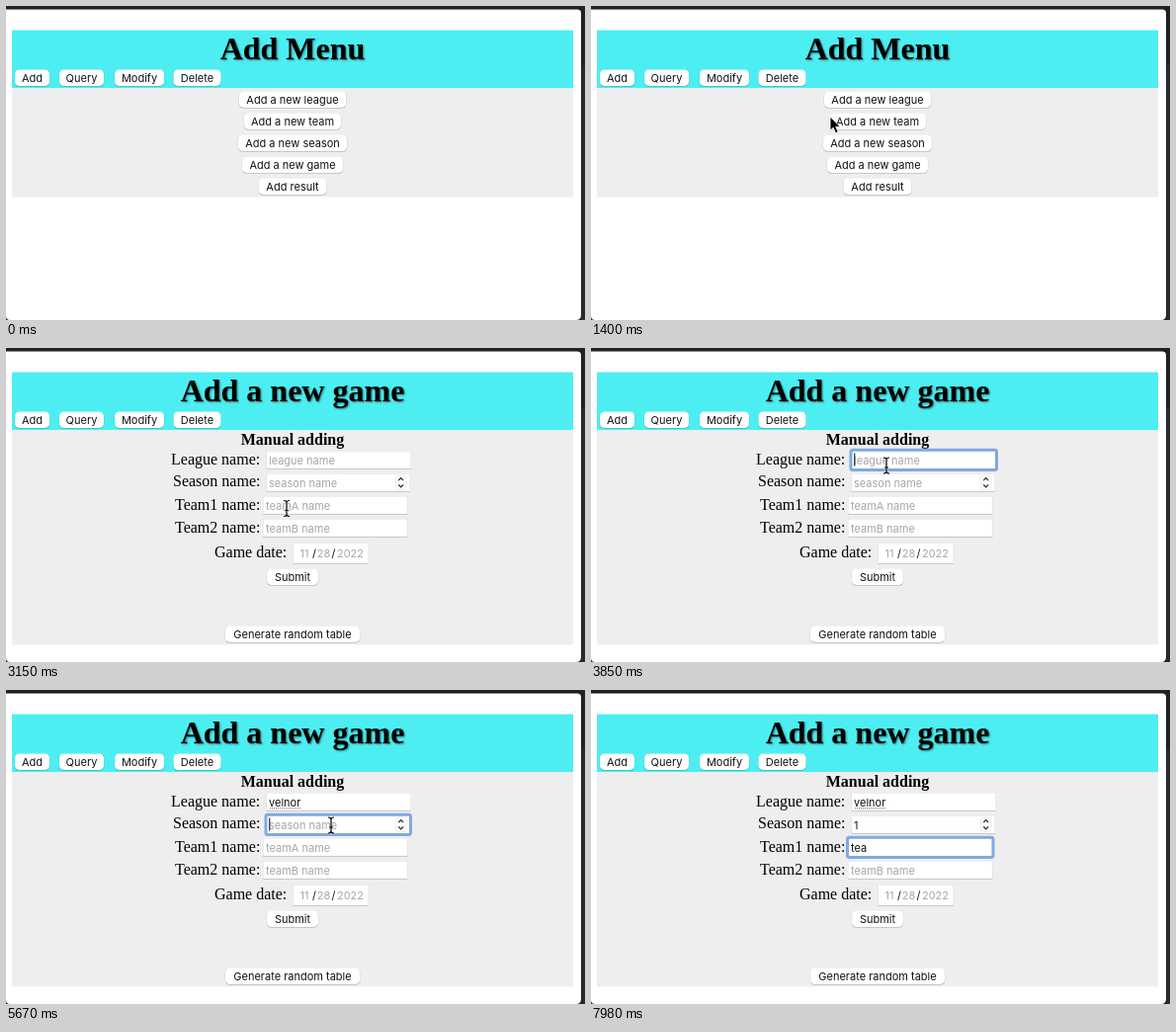
Write an HTML page that moves like this. It is 586x318 px and loops after 8000 ms.

```html
<!DOCTYPE html>
<html lang="en">
<head>
<meta charset="utf-8">
<title>Add a new game</title>
<style>
  html, body { margin: 0; width: 100%; height: 100%; overflow: hidden; background: #1f2127; }
  svg { display: block; width: 586px; height: 318px; }
  text { white-space: pre; }
  .ui { font: 11px Inter, Roboto, sans-serif; fill: #111; }
  .hint { fill: #a6a6a6; }
  .serif { font: 16px "Liberation Serif", serif; }
  .bold { font-weight: bold; }
  .title { font: bold 32px "Liberation Serif", serif; text-shadow: 1px 1px 2px rgba(0, 0, 0, .5); }
  .mid { text-anchor: middle; }
</style>
</head>
<body>
<svg id="stage" viewBox="0 0 586 318" xmlns="http://www.w3.org/2000/svg"></svg>
<script>
const LOOP = 8000, STEP = 70;

const rect = (x, y, w, h, fill, extra = "") =>
  `<rect x="${x}" y="${y}" width="${w}" height="${h}" fill="${fill}" ${extra}/>`;

const text = (x, y, content, cls, extra = "") =>
  `<text x="${x}" y="${y}" class="${cls}" ${extra}>${content}</text>`;

const button = (cx, cy, w, label) =>
  rect(cx - w / 2 - .5, cy - 8, w + 1, 17.3, "#000", 'rx="4.8" opacity=".09"') +
  rect(cx - w / 2, cy - 7.6, w, 16.8, "#000", 'rx="4.4" opacity=".14"') +
  rect(cx - w / 2, cy - 8, w, 16.4, "#fff", 'rx="4.4"') +
  text(cx, cy + 4, label, "ui mid");

const field = (x, y, w, h = 18.5) =>
  rect(x, y, w, h, "#dedede") +
  rect(x + .5, y + .5, w - 1, h - 1, "#fff") +
  rect(x, y + h - .6, w, .9, "#c2c2c2");

const row = (label, labelX, baseline, x, y, w) =>
  text(labelX, baseline, label, "serif") + field(x, y, w);

const fields = {
  league: { x: 266, y: 117.5, hint: "league name", ring: [263, 103.2, 147.5, 20.3] },
  season: { x: 266, y: 140.5, hint: "season name", ring: [263, 126.2, 146.5, 20.3] },
  team1:  { x: 263, y: 163.5, hint: "teamA name",  ring: [259.5, 149.2, 147.5, 20.3] },
  team2:  { x: 263, y: 186.5, hint: "teamB name" }
};

const shell =
  rect(0, 0, 586, 318, "#1f2127") +
  rect(582, 60, 4, 258, "#2b2f36", 'opacity=".6"') +
  '<path d="M0 3.5H578Q582 3.5 582 7V313Q582 318 577 318H4Q0 318 0 314Z" fill="#fff"/>';

const header =
  rect(6, 24.5, 568, 58.5, "#4deef2") +
  button(26.5, 72.5, 35, "Add") + button(76.5, 72.5, 45, "Query") +
  button(135, 72.5, 50, "Modify") + button(193.5, 72.5, 48, "Delete");

const menuPage =
  rect(6, 83, 568, 110.5, "#eee") +
  text(290, 53.5, "Add Menu", "title mid") +
  [["Add a new league", 108], ["Add a new team", 98], ["Add a new season", 110],
   ["Add a new game", 102], ["Add result", 69]]
    .map(([label, w], i) => button(290, 94.5 + 22 * i, w, label)).join("");

const formPage =
  rect(6, 83, 568, 217.5, "#eee") +
  text(290, 53.5, "Add a new game", "title mid") +
  text(290, 97.5, "Manual adding", "serif bold mid") +
  row("League name:", 167, 118, 263.5, 104, 146.5) +
  row("Season name:", 169, 140, 263.5, 127, 145.5) +
  row("Team1 name:", 171, 164, 260, 150, 146.5) +
  row("Team2 name:", 171, 187, 260, 173, 146.5) +
  text(211, 212, "Game date:", "serif") + field(290.5, 197, 76.5, 21.5) +
  text(302, 211.7, "11", "ui hint mid") + text(312, 211.7, "/", "ui mid") +
  text(321.5, 211.7, "28", "ui hint mid") + text(331.5, 211.7, "/", "ui mid") +
  text(348.5, 211.7, "2022", "ui hint mid") +
  rect(394.5, 129, 10.5, 14.5, "#fff", 'rx="3" stroke="#ddd" stroke-width=".6"') +
  '<path d="M397.2 134.2L399.7 131.6L402.2 134.2M397.2 138.4L399.7 141L402.2 138.4" fill="none" stroke="#222" stroke-width="1.2"/>' +
  button(290, 231.5, 52, "Submit") + button(290, 289.5, 136, "Generate random table") +
  '<rect id="ring" fill="none" stroke="#80a9e2" stroke-width="3" rx="2"/>' +
  Object.entries(fields).map(([id, f]) => text(f.x, f.y, f.hint, "ui hint", `id="${id}"`)).join("") +
  '<path id="spelling" d="M267 119.8H299" stroke="#555" stroke-width="1" stroke-dasharray="1 1"/>' +
  rect(0, 0, 1, 13, "#000", 'id="caret"');

const pointer =
  '<g id="cursor">' +
  '<circle id="press" r="16.2" fill="none" stroke="#000" stroke-width="1.7"/>' +
  '<path id="arrow" d="M0 0V14.2L3.2 11.2L5.6 16.8L8.2 15.6L5.8 10.3H10.2Z" fill="#000" stroke="#fff" stroke-width=".9"/>' +
  '<g id="beam" fill="none"><path d="M-3 -8Q0 -8 0 -6Q0 -8 3 -8M0 -6V6M-3 8Q0 8 0 6Q0 8 3 8M-2 2H2" stroke="#fff" stroke-width="2.4" opacity=".7"/>' +
  '<path d="M-3 -8Q0 -8 0 -6Q0 -8 3 -8M0 -6V6M-3 8Q0 8 0 6Q0 8 3 8M-2 2H2" stroke="#000" stroke-width="1.2"/></g></g>';

document.getElementById("stage").innerHTML =
  shell + header + `<g id="menu">${menuPage}</g><g id="form">${formPage}</g>` + pointer;

const el = id => document.getElementById(id);
const show = (id, on) => el(id).setAttribute("display", on ? "inline" : "none");
const within = (t, [from, to]) => t >= from && t < to;

// Pointer waypoints: time, x, y.
const path = [
  [70, 292, 293], [140, 287, 175], [210, 284, 118], [280, 284, 118],
  [490, 170, 96], [700, 22, 75], [770, 19, 74], [980, 19, 74], [1120, 62, 74],
  [1260, 165, 95], [1400, 242, 112], [1960, 271, 137], [2100, 280.5, 153.5],
  [2240, 281, 154.5], [2799, 281, 154.5], [2800, 284, 162.5], [3360, 284, 162.5],
  [3640, 299, 119], [4970, 299, 119], [5250, 329, 137], [5950, 329, 137],
  [6230, 293.5, 160], [LOOP, 293.5, 160]
];
const presses = [[770, 980], [2240, 2520], [3640, 3850], [5460, 5670], [6440, 6650]];

// Field values over time, and where the caret stands behind each.
const typing = [
  [4970, "league", "velnor"], [5950, "season", "1"],
  [7000, "team1", "t"], [7210, "team1", "te"], [7490, "team1", "tea"]
];
const focusTimes = [[3710, "league"], [5530, "season"], [6580, "team1"]];
const caretHidden = [[4480, 4970], [7980, LOOP]];

function pointAt(t) {
  const i = Math.max(1, path.findIndex(p => p[0] >= t));
  const [t0, x0, y0] = path[i - 1], [t1, x1, y1] = path[i];
  const k = Math.min(1, Math.max(0, (t - t0) / (t1 - t0)));
  return [x0 + (x1 - x0) * k, y0 + (y1 - y0) * k];
}

function drawForm(t) {
  const values = {};
  for (const [at, id, value] of typing) if (t >= at) values[id] = value;
  for (const id in fields) {
    const node = el(id), value = values[id] || fields[id].hint;
    if (node.textContent !== value) node.textContent = value;
    node.setAttribute("class", values[id] ? "ui" : "ui hint");
  }
  show("spelling", t >= 5530);

  const focus = focusTimes.filter(([at]) => t >= at).pop();
  show("ring", focus);
  show("caret", focus && !caretHidden.some(span => within(t, span)));
  if (!focus) return;

  const [since, id] = focus, f = fields[id], [x, y, w, h] = f.ring;
  const grow = 2 * Math.max(0, 1 - (t - since) / 140);
  const box = { x: x - grow, y: y - grow, width: w + 2 * grow, height: h + 2 * grow };
  for (const key in box) el("ring").setAttribute(key, box[key]);
  const typed = values[id] ? el(id).getComputedTextLength() : 0;
  el("caret").setAttribute("x", f.x + typed + .3);
  el("caret").setAttribute("y", f.y - 11);
}

function draw(time) {
  const t = Math.floor((time % LOOP) / STEP) * STEP;
  const onForm = t >= 2800;
  show("menu", !onForm);
  show("form", onForm);
  show("cursor", t >= 70 && t < 7000);
  show("arrow", !onForm);
  show("beam", onForm);
  show("press", presses.some(span => within(t, span)));
  el("cursor").setAttribute("transform", `translate(${pointAt(t)})`);
  if (onForm) drawForm(t);
}

const start = performance.now();
function tick() {
  draw(performance.now() - start);
  requestAnimationFrame(tick);
}
tick();
</script>
</body>
</html>
```
